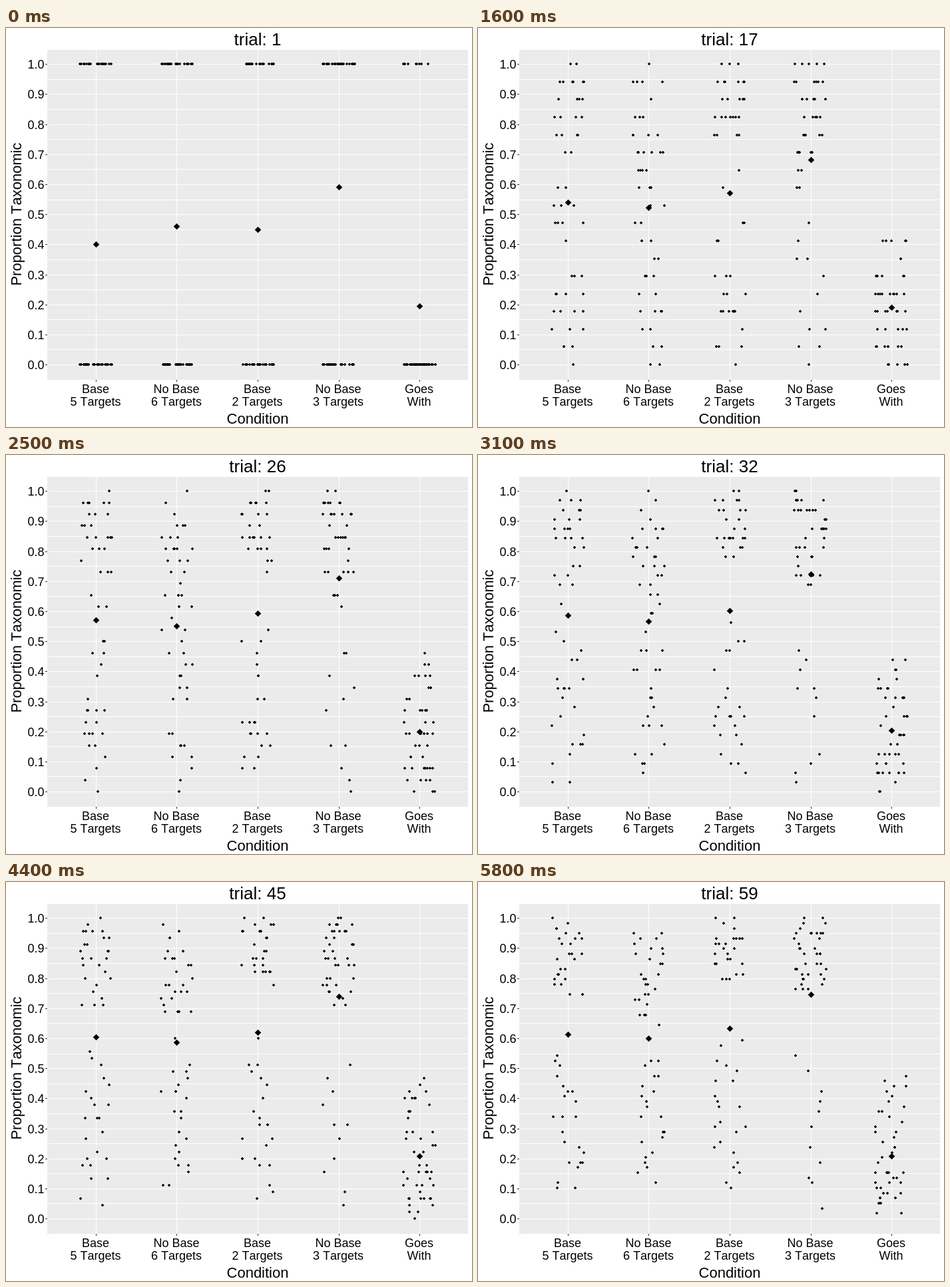
These frames come from a looping animation (700 by 600 pixels, 5.9 s). An HTML page with a canvas:

```html
<!DOCTYPE html>
<html lang="en">
<head>
<meta charset="utf-8">
<title>Proportion Taxonomic by Condition</title>
<style>
  html, body { margin: 0; width: 100%; height: 100%; overflow: hidden; background: #fff; }
  canvas { display: block; }
</style>
</head>
<body>
<canvas id="plot" width="700" height="600"></canvas>
<script>
const ctx = document.getElementById('plot').getContext('2d');
const TRIALS = 59, STEP = 100;
const PANEL = { left: 62, top: 33, right: 694, bottom: 529 };
const KEYS = [1, 10, 17, 38, 59];

// means: running mean at KEYS; share: part of the group in the upper cluster;
// high, low: range of final scores in each cluster
const groups = [
  { label: ['Base', '5 Targets'], people: 50, means: [.4, .503, .541, .6, .614],
    share: .54, high: [59, 43], low: [32, 4] },
  { label: ['No Base', '6 Targets'], people: 50, means: [.46, .488, .522, .579, .601],
    share: .56, high: [57, 39], low: [33, 8] },
  { label: ['Base', '2 Targets'], people: 49, means: [.449, .521, .571, .612, .633],
    share: .54, high: [59, 47], low: [35, 6] },
  { label: ['No Base', '3 Targets'], people: 49, means: [.592, .647, .682, .735, .746],
    share: .78, high: [59, 44], low: [33, 2] },
  { label: ['Goes', 'With'], people: 46, means: [.196, .182, .191, .208, .208],
    share: .5, high: [28, 10], low: [10, 1] }
];

const xAt = g => 134.9 + 121.54 * g;
const yAt = v => 506.05 - 451.78 * v;
const lerp = (a, b, t) => a + (b - a) * t;

function random(seed) {
  return () => {
    seed = (seed + 0x6D2B79F5) | 0;
    let t = Math.imul(seed ^ (seed >>> 15), 1 | seed);
    t = (t + Math.imul(t ^ (t >>> 7), 61 | t)) ^ t;
    return (((t ^ (t >>> 14)) >>> 0) + 0.5) / 4294967296;
  };
}

function meanAt(group, n) {
  let k = 0;
  while (k < KEYS.length - 2 && n > KEYS[k + 1]) k++;
  const t = Math.log(n / KEYS[k]) / Math.log(KEYS[k + 1] / KEYS[k]);
  return lerp(group.means[k], group.means[k + 1], t);
}

function finalScore({ share, high, low }, rank) {
  return Math.round(rank < share
    ? lerp(...high, rank / share)
    : lerp(...low, (rank - share) / (1 - share)));
}

// Each trial, the answers go to the people furthest from their final score, with noise.
function simulate(group, seed) {
  const rnd = random(seed), size = group.people;
  const totalAt = n => n ? Math.round(size * n * meanAt(group, n)) : 0;
  const goals = Array.from({ length: size }, (_, i) => finalScore(group, i / (size - 1)));
  const scores = new Array(size).fill(0);
  group.history = [];
  for (let n = 1; n <= TRIALS; n++) {
    const left = TRIALS - n + 1;
    const ranked = goals.map((goal, i) => {
      const need = Math.min(left, Math.max(0, goal - scores[i]));
      const u = rnd();
      return { i, rank: Math.log((need + .05) / (left - need + .05)) + Math.log(u / (1 - u)) };
    }).sort((a, b) => b.rank - a.rank);
    const hits = Math.max(0, totalAt(n) - totalAt(n - 1));
    ranked.slice(0, hits).forEach(p => scores[p.i]++);
    group.history.push(scores.map(s => s / n));
  }
}
groups.forEach((group, g) => simulate(group, 71 + g * 13));

function text(str, x, y, size, align = 'center') {
  ctx.font = size + 'px "Liberation Sans", Arial, sans-serif';
  ctx.textAlign = align;
  ctx.fillText(str, x, y);
}

function drawAxes() {
  const { left, top, right, bottom } = PANEL;
  ctx.fillStyle = '#fff';
  ctx.fillRect(0, 0, 700, 600);
  ctx.fillStyle = '#ebebeb';
  ctx.fillRect(left, top, right - left, bottom - top);

  ctx.fillStyle = '#fff';
  for (let i = 0; i <= 20; i++) ctx.fillRect(left, Math.round(yAt(i / 20)), right - left, 1);
  groups.forEach((_, g) => ctx.fillRect(Math.round(xAt(g)), top, 1, bottom - top));

  ctx.fillStyle = '#333';
  for (let i = 0; i <= 10; i++) ctx.fillRect(left - 3, Math.round(yAt(i / 10)), 3, 1);
  groups.forEach((_, g) => ctx.fillRect(Math.round(xAt(g)), bottom, 1, 3));

  ctx.fillStyle = '#000';
  for (let i = 0; i <= 10; i++) text((i / 10).toFixed(1), 57.5, Math.round(yAt(i / 10)) + 7, 18, 'right');
  groups.forEach((group, g) =>
    group.label.forEach((line, row) => text(line, xAt(g) - .5, 549 + 19 * row, 18)));
  text('Condition', 378, 595, 22);
  ctx.save();
  ctx.translate(23, 280);
  ctx.rotate(-Math.PI / 2);
  text('Proportion Taxonomic', 0, 0, 22);
  ctx.restore();
}

function dot(x, y) {
  x = Math.round(x);
  y = Math.round(y);
  ctx.fillRect(x - 1, y - 2, 2, 1);
  ctx.fillRect(x - 2, y - 1, 4, 2);
  ctx.fillRect(x - 1, y + 1, 2, 1);
}

function diamond(x, y) {
  const r = 4.8;
  x = Math.round(x) + .5;
  y = Math.round(y) + .5;
  ctx.beginPath();
  ctx.moveTo(x, y - r);
  ctx.lineTo(x + r, y);
  ctx.lineTo(x, y + r);
  ctx.lineTo(x - r, y);
  ctx.fill();
}

function draw(n) {
  const rnd = random(n * 977);
  ctx.fontKerning = 'none';
  drawAxes();
  text('trial: ' + n, 378, 26, 26);
  ctx.fillStyle = 'rgba(0,0,0,.86)';
  groups.forEach((group, g) =>
    group.history[n - 1].forEach(v => dot(xAt(g) + (rnd() * 2 - 1) * 24.3, yAt(v))));
  ctx.fillStyle = '#000';
  groups.forEach((group, g) => diamond(xAt(g), yAt(meanAt(group, n))));
}

let shown = 0;
const start = performance.now();
function tick(now) {
  const n = Math.floor(Math.max(0, now - start) / STEP) % TRIALS + 1;
  if (n !== shown) draw(shown = n);
  requestAnimationFrame(tick);
}
tick(start);
</script>
</body>
</html>
```
